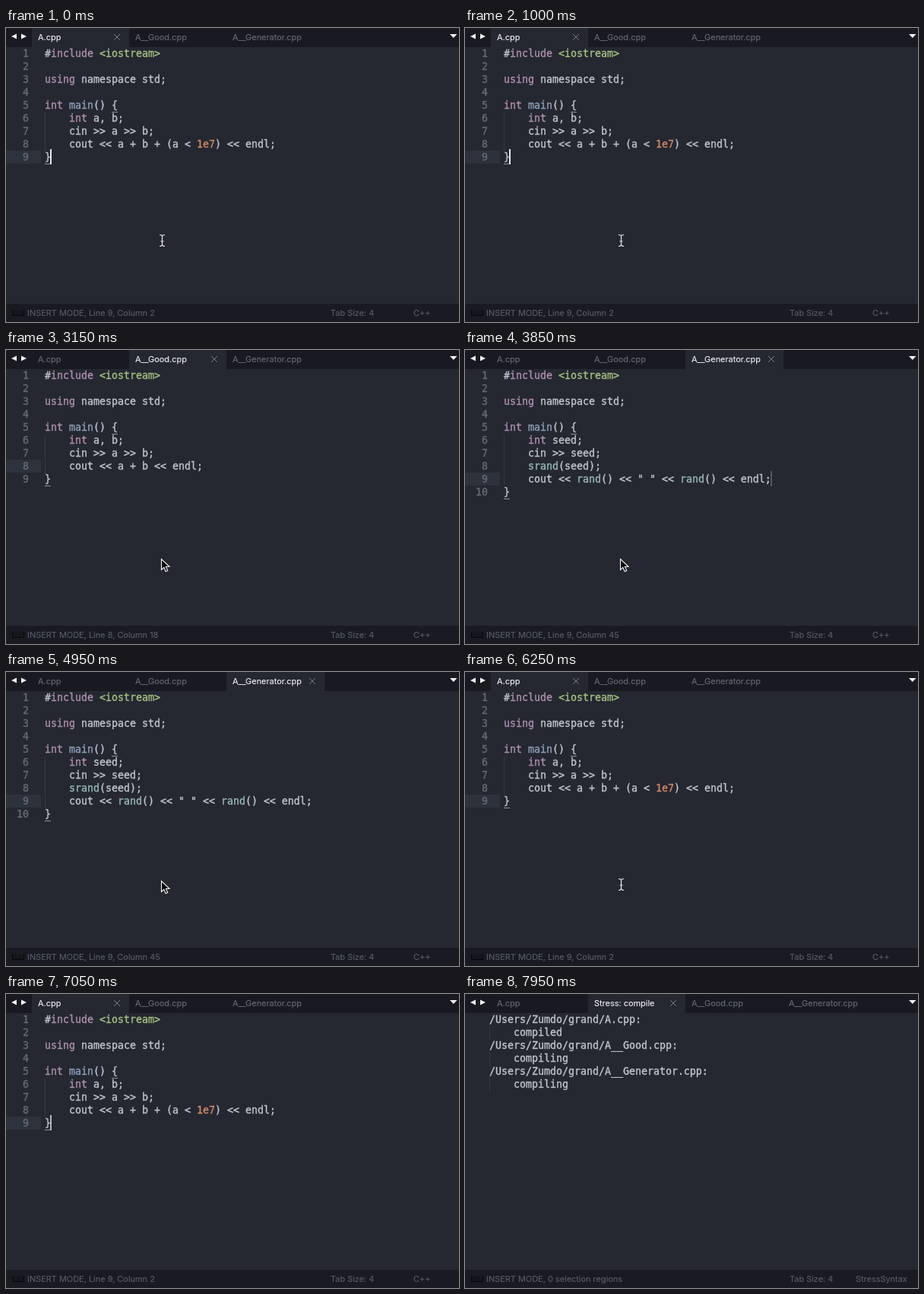
Recreate the animation shown at these times as an HTML page. Size 596 by 386 pixels, loop 8000 ms.

```html
<!DOCTYPE html>
<html lang="en">
<head>
<meta charset="utf-8">
<title>Stress test run</title>
<style>
  html, body { margin: 0; width: 100%; height: 100%; overflow: hidden; background: #252831; }
  svg { display: block; width: 596px; height: 386px; }
  /* A hairline stroke gives the heavier look of light text on dark. */
  text { white-space: pre; fill: currentColor; stroke: currentColor; stroke-width: .12; }
  tspan { fill: currentColor; stroke: currentColor; }
  .code { font: 13.29px "DejaVu Sans Mono", monospace; color: #c0c5ce; stroke-width: .35; }
  .ui { font: 10.95px Inter, sans-serif; }
  .list { font: 13.9px Inter, sans-serif; color: #9aa1a9; }
  .list .hit { font-weight: 700; color: #c5cad0; }
  .list.on, .list.on .hit { color: #d3d6db; }
  .list.on .hit { color: #f2f3f5; }
</style>
</head>
<body>
<svg id="stage" viewBox="0 0 596 386"></svg>
<script>
const LOOP = 8000, CHAR = 8, ROW = 17, TAB = 128;
const stage = document.getElementById('stage');

function add(parent, tag, attrs = {}, content) {
  const node = document.createElementNS('http://www.w3.org/2000/svg', tag);
  for (const key in attrs) node.setAttribute(key, attrs[key]);
  if (content !== undefined) node.textContent = content;
  parent.append(node);
  return node;
}
const box = (parent, x, y, width, height, fill) => add(parent, 'rect', {x, y, width, height, fill});
const label = (parent, x, y, content, color = '') =>
  add(parent, 'text', {class: 'ui', x, y, style: `color:${color}`}, content);
const show = (node, on) => { node.style.display = on ? '' : 'none'; };
const clamp = v => Math.min(1, Math.max(0, v));
const smooth = v => (1 - Math.cos(Math.PI * clamp(v))) / 2;
const baseline = row => 21 + ROW * row;

const tokenColors = [
  [/^(include|using|int)$/, '#b08fae'],
  [/^main$/, '#8fa1b8'],
  [/^<iostream>$/, '#a5c183'],
  [/^s?rand$/, '#98b9b5'],
  [/^1e7$/, '#d0876c'],
];
const tokens = /(\b(?:include|using|int|main|s?rand|1e7)\b|<iostream>)/;

function codeLine(parent, x, row, line, plain) {
  const source = line.trimStart();
  const text = add(parent, 'text', {
    class: 'code', x: x + CHAR * (line.length - source.length), y: baseline(row),
  });
  if (plain) { text.textContent = source; return text; }
  for (const part of source.split(tokens)) {
    if (!part) continue;
    const rule = tokenColors.find(([pattern]) => pattern.test(part));
    add(text, 'tspan', rule ? {style: `color:${rule[1]}`} : {}, part);
  }
  return text;
}

function guide(parent, x, first, last) {
  add(parent, 'line', {
    x1: x + .5, x2: x + .5, y1: 9 + ROW * first, y2: 26 + ROW * last,
    stroke: '#434853', 'stroke-dasharray': '1 1',
  });
}

function editor(body, caretRow, caretColumn) {
  const group = add(stage, 'g');
  const lines = ['#include <iostream>', '', 'using namespace std;', '', 'int main() {',
    ...body.map(line => '    ' + line), '}'];
  box(group, 0, 8 + ROW * caretRow, 46, ROW, '#2d323c');
  lines.forEach((line, i) => {
    add(group, 'text', {class: 'code', x: 30, y: baseline(i + 1), 'text-anchor': 'end',
      style: 'color:#656b75'}, i + 1);
    if (line) codeLine(group, 51, i + 1, line);
  });
  guide(group, 51, 6, lines.length - 1);
  const brackets = add(group, 'g');
  box(brackets, 139, 110, 8, 1, '#8d929b');
  box(brackets, 51, 8 + ROW * lines.length + 17, 8, 1, '#8d929b');
  const caret = box(group, 50 + CHAR * (caretColumn - 1), 6 + ROW * caretRow, 2, 20, '#e4e6ea');
  return {group, brackets, caret, status: `INSERT MODE, Line ${caretRow}, Column ${caretColumn}`};
}

box(stage, 0, 0, 596, 386, '#252831');

const views = {
  main: editor(['int a, b;', 'cin >> a >> b;', 'cout << a + b + (a < 1e7) << endl;'], 9, 2),
  good: editor(['int a, b;', 'cin >> a >> b;', 'cout << a + b << endl;'], 8, 18),
  generator: editor(['int seed;', 'cin >> seed;', 'srand(seed);',
    'cout << rand() << " " << rand() << endl;'], 9, 45),
  stress: {group: add(stage, 'g'), status: 'INSERT MODE, 0 selection regions'},
};
const results = ['A', 'A__Good', 'A__Generator'].map((name, i) => {
  const row = 2 * i + 1, parent = views.stress.group;
  codeLine(parent, 32, row, `/Users/Zumdo/grand/${name}.cpp:`, true);
  guide(parent, 32, row + 1, row + 1);
  return codeLine(parent, 32, row + 1, '    compiling', true);
});

// Tab bar
box(stage, 0, 0, 596, 25, '#191a21');
const tabs = {};
for (const [key, title, width] of [['main', 'A.cpp', TAB], ['stress', 'Stress: compile', TAB],
  ['good', 'A__Good.cpp', TAB], ['generator', 'A__Generator.cpp', TAB + 1]]) {
  const group = add(stage, 'g');
  const back = box(group, 0, 0, width, 25, '#252831');
  const text = label(group, 8, 16, title);
  const close = add(group, 'path', {
    d: `M${width - 20} 8l8 8m0-8l-8 8`, stroke: '#777c86', fill: 'none',
  });
  tabs[key] = {group, back, text, close};
}
add(stage, 'path', {d: 'M14 7.500v7l-7-3.500zM20 7.500v7l7-3.500zM584 8h9.500l-4.700 5z', fill: '#f4f4f5'});

// Status bar
box(stage, 0, 362, 596, 24, '#1a1b22');
add(stage, 'path', {d: 'M8.500 370.500v7h15v-7', fill: '#15161b', stroke: '#050506'});
const statusText = label(stage, 28, 378, '', '#565d68');
label(stage, 427, 378, 'Tab Size: 4', '#565d68');
const syntaxText = label(stage, 536, 378, '', '#565d68');

// Mouse pointers
const beam = add(stage, 'path', {
  d: 'M202 271.500q3.500 0 3.500 2.500v10q0 2.500-3.500 2.500M209 271.500q-3.500 0-3.500 2.500M209 286.500q-3.500 0-3.500-2.500M203.500 280h4',
  fill: 'none', stroke: '#e8e9eb', 'stroke-width': 1.2,
});
const arrow = add(stage, 'path', {
  d: 'M204.500 274.500v14l3.300-3 2.300 5.300 2.600-1.100-2.300-5.200h4.600z',
  fill: '#08080a', stroke: '#f3f3f4', 'stroke-width': 1.1,
});

// Command palette
const palette = add(stage, 'g');
box(palette, 60, 25, 477, 30, '#191a20');
box(palette, 60, 55, 477, 262, '#2d353d');
box(palette, 60, 239, 477, 34, '#1e2129');
box(palette, 533, 78, 4, 64, '#4b555e');
add(palette, 'rect', {x: 67, y: 31, width: 14, height: 18, rx: 2, fill: '#4a505b'});
add(palette, 'text', {class: 'list', x: 68, y: 45, style: 'color:#c0c5ce'}, 'm');
const inputCaret = box(palette, 79, 31, 2, 18, '#dfe1e5');
[['Set Syntax: ', 'ATLAB'], ['Set Syntax: ', 'arkdown'], ['Set Syntax: ', 'akefile'],
  ['SublimeREPL: ', 'ozRepl'], ['Set Syntax: ', 'ultiMarkdown'],
  ['FastOlympicCoding: ', 'ake Stress'], ['View: Toggle ', 'inimap']].forEach(([head, tail], i) => {
  const text = add(palette, 'text', {class: i === 5 ? 'list on' : 'list', x: 68, y: 91 + 34 * i});
  add(text, 'tspan', {}, head);
  add(text, 'tspan', {class: 'hit'}, 'M');
  add(text, 'tspan', {}, tail);
});

// [start, view, moment the caret blink restarts]
const scenes = [
  [0, 'main', -100], [1500, 'good', 1600], [3400, 'generator', 3400],
  [5650, 'main', 5700], [7100, 'stress', 7100],
];
const paletteOpen = 6500, paletteClose = 7050, compiledAt = 7650;

function blink(age) {
  if (age < 0) return 1;
  const phase = age % 1000;
  if (age >= 950 && (phase >= 950 || phase < 100)) return smooth(((phase + 50) % 1000) / 150);
  return 1 - smooth((phase - 250) / 300);
}

function draw(t) {
  const [, name, restart] = scenes.findLast(scene => t >= scene[0]);
  const view = views[name];
  const open = t >= paletteOpen && t < paletteClose;

  for (const key in views) show(views[key].group, key === name);
  if (view.caret) {
    view.caret.style.opacity = open ? 0 : blink(t - restart);
    show(view.brackets, !open);
  }
  results[0].textContent = t >= compiledAt ? 'compiled' : 'compiling';

  const grow = name === 'stress' ? clamp((t - paletteClose) / 150) : 0;
  const positions = {main: 34, stress: 162, good: 162 + TAB * grow, generator: 290 + TAB * grow};
  for (const key in tabs) {
    const {group, back, text, close} = tabs[key], active = key === name;
    group.setAttribute('transform', `translate(${positions[key]} 0)`);
    text.style.color = active ? '#f1f2f4' : '#646a74';
    show(back, active);
    show(close, active);
  }
  show(tabs.stress.group, grow > 0);
  tabs.stress.back.setAttribute('width', TAB * grow);
  tabs.stress.text.style.opacity = tabs.stress.close.style.opacity = grow;

  statusText.textContent = view.status;
  syntaxText.textContent = name === 'stress' ? 'StressSyntax' : 'C++';
  syntaxText.setAttribute('x', name === 'stress' ? 514 : 536);

  show(beam, name === 'main' && t < paletteOpen);
  show(arrow, name === 'good' || name === 'generator');
  show(palette, open);
  inputCaret.style.opacity = blink(t - paletteOpen);
}

const start = performance.now();
function tick() {
  draw((performance.now() - start) % LOOP);
  requestAnimationFrame(tick);
}
tick();
</script>
</body>
</html>
```
